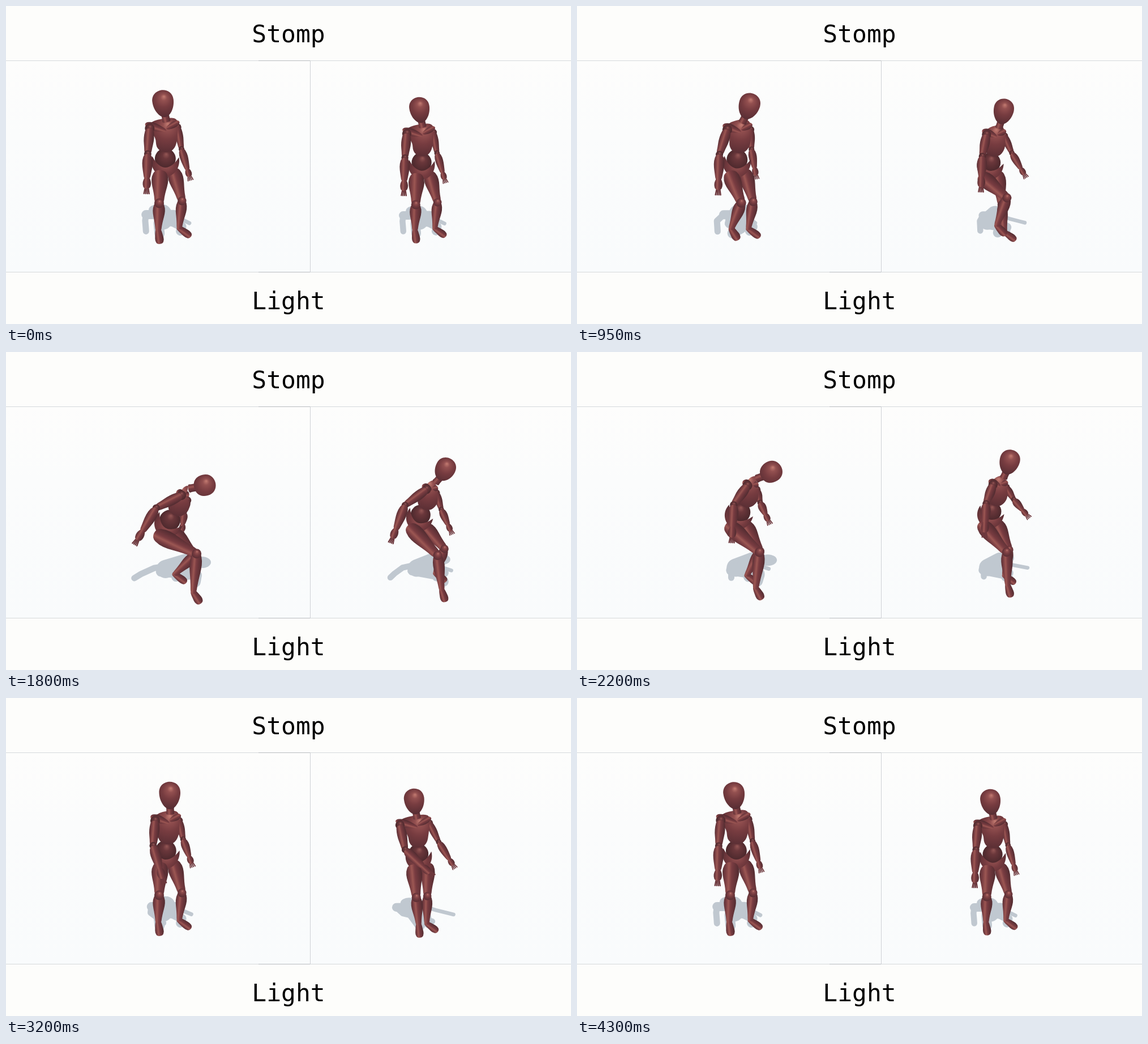
Animation, 998 px wide and 561 px high, one loop 4350 ms. Source, as an HTML page with a canvas:

```html
<!DOCTYPE html>
<html lang="en">
<head>
<meta charset="utf-8">
<title>Stomp, Light</title>
<style>
html, body { margin: 0; width: 998px; height: 561px; overflow: hidden; background: #fdfdfb; }
canvas { display: block; }
</style>
</head>
<body>
<canvas id="stage" width="998" height="561"></canvas>
<script>
const ctx = document.getElementById('stage').getContext('2d');
const LOOP = 4350, STEP = 50;

// A pose is hips, wrists and ankles, plus the tilt of spine and head in degrees.
// The other joints follow from these in skeleton().
const rest = { hips: [281, 280], lean: [2], nod: [-13], handN: [249, 306], handF: [321, 290],
               footN: [269, 396], footF: [306, 392] };
const reach = { ...rest, hips: [276, 279], nod: [-7], handN: [285, 293], handF: [334, 280],
                footN: [276, 400], footF: [291, 398] };
const crouch = { hips: [282, 285], lean: [18], nod: [73], handN: [251, 312], handF: [316, 292],
                 footN: [281, 390], footF: [299, 394] };
const lift = { hips: [275, 282], lean: [25], nod: [42], handN: [235, 307], handF: [335, 287],
               footN: [305, 373], footF: [317, 400] };
const hardStomp = { hips: [284, 306], lean: [31], nod: [81], handN: [240, 318], handF: [312, 305],
                    footN: [331, 424], footF: [298, 392] };
const softStomp = { ...lift, hips: [275, 291], handN: [233, 310], handF: [331, 301],
                    footN: [319, 421], footF: [307, 390] };
const hardRise = { hips: [282, 278], lean: [18], nod: [48], handN: [309, 304], handF: [355, 270],
                   footN: [292, 405], footF: [303, 396] };
const softRise = { ...reach, lean: [11], nod: [2], handN: [302, 286], handF: [345, 246],
                   footN: [294, 402], footF: [300, 398] };
const settle = { ...rest, lean: [7], nod: [-2], handN: [272, 303], handF: [324, 281] };

const TIMES = [0, 600, 1300, 1800, 2600, 3200, 4300];
const left = [rest, { ...rest, handF: [312, 285] }, crouch, hardStomp, hardRise, settle, rest];
const right = [rest, reach, lift, softStomp, softRise, { ...reach, lean: [-2], nod: [-12] }, rest];

// Monotone cubic between keys, so planted feet never overshoot.
function ease(keys, t, read) {
  let k = 0;
  while (k < TIMES.length - 2 && t >= TIMES[k + 1]) k++;
  const rate = j => (read(keys[j + 1]) - read(keys[j])) / (TIMES[j + 1] - TIMES[j]);
  const slope = j => {
    if (j < 1 || j > TIMES.length - 2) return 0;
    const a = rate(j - 1), b = rate(j);
    return a * b > 0 ? 2 * a * b / (a + b) : 0;
  };
  const span = TIMES[k + 1] - TIMES[k];
  const u = Math.min(1, (t - TIMES[k]) / span), w = 1 - u;
  return read(keys[k]) * w * w * (1 + 2 * u) + read(keys[k + 1]) * u * u * (3 - 2 * u) +
    span * u * w * (w * slope(k) - u * slope(k + 1));
}

const mix = (a, b, u) => ({ x: a.x + (b.x - a.x) * u, y: a.y + (b.y - a.y) * u });
const move = (p, x, y) => ({ x: p.x + x, y: p.y + y });
const span = (a, b) => Math.hypot(b.x - a.x, b.y - a.y) || 1;
const turn = (p, deg, rx, ry) =>
  move(p, rx * Math.sin(deg * Math.PI / 180), -ry * Math.cos(deg * Math.PI / 180));
const extend = (a, b, d) => mix(a, b, 1 + d / span(a, b));

// Middle joint of a limb from a to b, pushed sideways by bend.
function joint(a, b, bend) {
  const d = span(a, b), m = mix(a, b, .5);
  return move(m, (b.y - a.y) / d * bend, (a.x - b.x) / d * bend);
}

function skeleton(keys, t) {
  const value = (name, i = 0) => ease(keys, t, pose => pose[name][i]);
  const point = name => ({ x: value(name), y: value(name, 1) });
  const hips = point('hips');
  const neck = turn(hips, value('lean'), 76, 76);
  const top = turn(neck, value('nod'), 29, 38);
  const tilt = neck.x - hips.x;

  const makeArm = (shoulder, wrist, bend, reachTip) => {
    const elbow = joint(shoulder, wrist, bend);
    return [shoulder, elbow, wrist, extend(elbow, wrist, reachTip)];
  };
  const makeLeg = (hip, ankle, bone) => {
    const half = span(hip, ankle) / 2;
    return [hip, joint(hip, ankle, Math.sqrt(Math.max(0, bone * bone - half * half))), ankle];
  };
  const shoulderN = move(neck, .45 * tilt - 31, 12);
  const shoulderF = move(neck, 21 - .6 * tilt, 9 + .3 * tilt);
  const handN = point('handN'), footN = point('footN'), footF = point('footF');
  const swing = Math.min(13, Math.abs(handN.x - shoulderN.x + 5) * .5);
  // A foot set forward is nearer to the camera, so its leg looks longer.
  const nearLeg = makeLeg(move(hips, -9, 20), footN, 48 + Math.max(0, footN.x - 269) * .33);
  const farLeg = makeLeg(move(hips, 17, 17), footF, 48.5);
  const bend = Math.max(0, nearLeg[1].x - footN.x) + Math.max(0, nearLeg[1].x - hips.x - 10) * .3;
  nearLeg.push(move(footN, 2 + Math.min(20, bend * .5), 21 - Math.min(8, bend * .2)));
  farLeg.push(move(footF, 18, 13));
  return { hips, neck, top, ribs: mix(neck, hips, .47), nearLeg, farLeg,
           nearArm: makeArm(shoulderN, handN, -swing - 1, 25),
           farArm: makeArm(shoulderF, point('handF'), -2, 18) };
}

function smoothFill(pts, fill) {
  const n = pts.length;
  const start = mix(pts[n - 1], pts[0], .5);
  ctx.beginPath();
  ctx.moveTo(start.x, start.y);
  pts.forEach((p, i) => {
    const m = mix(p, pts[(i + 1) % n], .5);
    ctx.quadraticCurveTo(p.x, p.y, m.x, m.y);
  });
  ctx.fillStyle = fill;
  ctx.fill();
}

function shade(gradient, stops) {
  stops.forEach(([at, colour]) => gradient.addColorStop(at, colour));
  return gradient;
}
const ROUND = [[0, '#c47c72'], [.2, '#935050'], [.5, '#773c40'], [1, '#542c32']];
const DEEP = [[0, '#955755'], [.3, '#6a373b'], [1, '#452529']];
const TUBE = [[0, '#593136'], [.2, '#7a3e42'], [.38, '#9c5753'], [.55, '#793c41'], [1, '#502b30']];

const sphere = (x, y, r, stops) =>
  shade(ctx.createRadialGradient(x + r * .1, y - r * .45, 0, x, y, r * 1.1), stops);

function ball(p, r, stops = DEEP) {
  ctx.fillStyle = sphere(p.x, p.y, r, stops);
  ctx.beginPath();
  ctx.arc(p.x, p.y, r, 0, 7);
  ctx.fill();
}

// A tapered segment whose half widths run evenly from a to b.
function limb(a, b, widths, s = 1) {
  const len = span(a, b);
  let nx = (a.y - b.y) / len, ny = (b.x - a.x) / len;
  if (nx > 0) { nx = -nx; ny = -ny; }
  const side = d => widths.map((w, i) =>
    move(mix(a, b, i / (widths.length - 1)), nx * w * s * d, ny * w * s * d));
  const c = mix(a, b, .5), r = Math.max(...widths) * s;
  const g = ctx.createLinearGradient(c.x + nx * r, c.y + ny * r, c.x - nx * r, c.y - ny * r);
  smoothFill([...side(1), ...side(-1).reverse()], shade(g, TUBE));
}

function arm([shoulder, elbow, wrist, tip], s) {
  ball(shoulder, 8.5 * s);
  limb(shoulder, elbow, [7, 9, 9, 7, 6], s);
  ball(elbow, 6.5 * s);
  limb(elbow, wrist, [6, 9.5, 9, 7, 5], s);
  const palm = mix(wrist, tip, .65), len = span(wrist, tip);
  const nx = (wrist.y - tip.y) / len, ny = (tip.x - wrist.x) / len;
  ctx.strokeStyle = '#6d383d';
  ctx.lineWidth = 2.4 * s;
  ctx.lineCap = 'round';
  for (let f = -1.5; f < 2; f++) {
    ctx.beginPath();
    ctx.moveTo(palm.x + nx * f * 2, palm.y + ny * f * 2);
    ctx.lineTo(tip.x + nx * f * 3, tip.y + ny * f * 3);
    ctx.stroke();
  }
  limb(mix(wrist, palm, -.25), palm, [4, 7, 7.5, 5], s);
}

function leg([hip, knee, ankle, toe], s) {
  limb(mix(hip, knee, -.22), knee, [9, 15, 14.5, 11.5, 9, 8], s);
  limb(mix(ankle, toe, -.2), mix(ankle, toe, 1.15), [4, 6, 7, 8, 5], s);
  limb(mix(knee, ankle, -.04), mix(knee, ankle, 1.04), [7, 11, 10.5, 8, 6, 5], s);
  ball(knee, 8.5 * s, ROUND);
}

function torso({ neck, ribs, hips, nearArm: [a], farArm: [b] }) {
  const tilt = Math.atan2(ribs.x - hips.x, hips.y - ribs.y);
  const at = (x, y) => move(ribs, x * Math.cos(tilt) - y * Math.sin(tilt),
                                  x * Math.sin(tilt) + y * Math.cos(tilt));
  smoothFill([at(-18, -6), at(-17, 9), at(-8, 18), at(8, 18), at(17, 9), at(20, -6),
              move(b, 1, -2), move(b, -1, -16), move(neck, 0, -7), move(a, 0, -12), move(a, 0, 3)],
             sphere(ribs.x, ribs.y - 16, 36, ROUND));
  limb(move(a, -8, -8), mix(neck, ribs, .45), [3, 7, 7, 5, 2]);
  limb(move(b, 3, -10), mix(neck, ribs, .35), [3, 6, 5, 2]);
}

function pelvis({ ribs, hips }) {
  ball(mix(ribs, hips, .74), 18.5);
  ctx.save();
  ctx.translate(hips.x, hips.y);
  ctx.rotate(Math.atan2(ribs.x - hips.x, hips.y - ribs.y));
  ctx.beginPath();
  ctx.moveTo(-23, -14);
  ctx.bezierCurveTo(-29, 6, -14, 21, 2, 21);
  ctx.bezierCurveTo(17, 20, 28, 4, 24, -14);
  ctx.quadraticCurveTo(13, 5, 0, 5);
  ctx.quadraticCurveTo(-13, 4, -23, -14);
  ctx.fillStyle = sphere(0, 6, 27, ROUND);
  ctx.fill();
  ctx.restore();
}

function head({ top, neck }) {
  const r = 18.8, dx = (neck.x - top.x) * .5, dy = (neck.y - top.y) * .65;
  const chin = move(top, dx, dy), low = Math.max(r, Math.hypot(dx, dy) + 5);
  const angle = Math.atan2(-dx, dy);
  limb(mix(top, chin, .8), mix(chin, neck, 1.1), [6, 7, 6.5, 8]);
  ctx.save();
  ctx.translate(top.x, top.y);
  ctx.rotate(angle);
  ctx.beginPath();
  ctx.moveTo(-r, 0);
  ctx.bezierCurveTo(-r, -1.33 * r, r, -1.33 * r, r, 0);
  ctx.bezierCurveTo(r, .8 * r, .5 * r, low, 0, low);
  ctx.bezierCurveTo(-.5 * r, low, -r, .8 * r, -r, 0);
  ctx.rotate(-angle);
  ctx.fillStyle = shade(ctx.createRadialGradient(r * .1, -r * .4, 0, 0, 2, r * 1.5), ROUND);
  ctx.fill();
  ctx.restore();
}

function shadow({ top, neck, hips, nearArm, farArm, nearLeg, farLeg }) {
  // Flattened on the ground behind the feet.
  const ground = (p, depth = 0) =>
    ({ x: p.x + 3 + .05 * (p.y - 410), y: 400 + .165 * (p.y - 410) + depth });
  const trace = (pts, width, depth = 0) => {
    ctx.lineWidth = width;
    ctx.beginPath();
    pts.forEach((p, i) => {
      const g = ground(p, depth * i / pts.length);
      ctx.lineTo(g.x, g.y);
    });
    ctx.stroke();
  };
  ctx.save();
  ctx.strokeStyle = ctx.fillStyle = '#c0c8d0';
  ctx.lineCap = ctx.lineJoin = 'round';
  ctx.filter = 'blur(0.7px)';
  trace([neck, hips], 32);
  trace([nearArm[0], farArm[0]], 16);
  trace(nearArm, 11, 14);
  trace(farArm, 7);
  trace([hips, ...nearLeg.slice(0, 3)], 18, 5);
  trace([hips, ...farLeg.slice(0, 3)], 16);
  const h = ground(top);
  ctx.beginPath();
  ctx.ellipse(h.x, h.y, 16, 10, 0, 0, 7);
  ctx.fill();
  ctx.restore();
}

function mannequin(body) {
  shadow(body);
  arm(body.farArm, .78);
  leg(body.farLeg, .9);
  pelvis(body);
  leg(body.nearLeg, 1);
  torso(body);
  head(body);
  arm(body.nearArm, 1);
}

function backdrop() {
  const rule = (colour, ...box) => { ctx.fillStyle = colour; ctx.fillRect(...box); };
  rule('#fdfdfb', 0, 0, 998, 561);
  rule(shade(ctx.createLinearGradient(0, 96, 0, 470),
    [[0, '#fdfdfc'], [.35, '#fbfcfc'], [1, '#f9fbfc']]), 0, 96, 998, 374);
  for (const y of [96, 469]) {
    rule('#d6d9dc', 0, y, 998, 1);
    rule('#b8bcc1', 446, y, 92, 1);
  }
  rule('#cfd2d6', 537, 96, 1, 374);
  ctx.fillStyle = '#000';
  ctx.font = '43px "DejaVu Sans Mono", monospace';
  ctx.textAlign = 'center';
  ctx.fillText('Stomp', 499, 64);
  ctx.fillText('Light', 499, 535);
}

function draw(now) {
  const t = Math.floor(now % LOOP / STEP) * STEP;
  backdrop();
  mannequin(skeleton(left, t));
  ctx.save();
  ctx.translate(729, 417);
  ctx.scale(.95, .95);
  ctx.translate(-276, -418);
  mannequin(skeleton(right, t));
  ctx.restore();
}

const start = performance.now();
function tick() {
  draw(performance.now() - start);
  requestAnimationFrame(tick);
}
tick();
</script>
</body>
</html>
```
